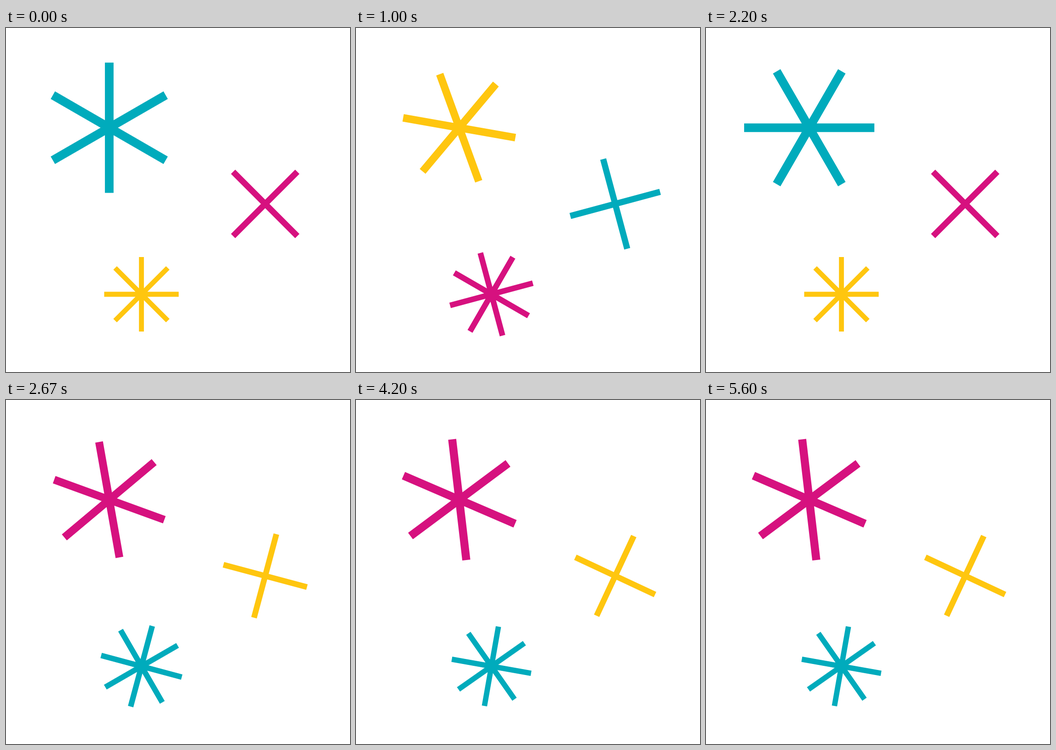
Animation of 748x748 px, one loop 5.74 s. Source, as an HTML page with a canvas:

```html
<!DOCTYPE html>
<html lang="en">
<head>
<meta charset="utf-8">
<title>Spinning stars</title>
<style>
  html, body { margin: 0; width: 100%; height: 100%; overflow: hidden; background: #fff; }
  canvas { display: block; width: 100%; height: 100%; }
</style>
</head>
<body>
<canvas id="stage" width="748" height="748"></canvas>
<script>
const ctx = document.getElementById('stage').getContext('2d');

const LOOP = 5740;
const LAST_STEP = 70;
const BEAT = 400;                           // five steps per beat
const STARTS = [0, 130, 200, 270, 330];     // when each step of a beat begins
const PULSE = 18;                           // steps per pulse cycle
const COLOR_HOLD = 3;                       // steps per colour
const THICKNESS = 0.133;                    // line width relative to arm length

const COLORS = ['#00abbc', '#ffc60f', '#d6117f'];

// turn: degrees per step; keys: [step, arm length] over one pulse cycle
const STARS = [
  { x: 224.5, y: 216.8, bars: 3, angle: 0, turn: 10 / 3, color: 0,
    keys: [[0, 141.6], [5, 118], [9, 141.6], [13, 118], [18, 141.6]] },
  { x: 563.6, y: 382.5, bars: 2, angle: 45, turn: 10, color: 2,
    keys: [[-3, 94], [3, 103.4], [7, 94], [11, 103.4], [15, 94], [21, 103.4]] },
  { x: 294.5, y: 579, bars: 4, angle: 0, turn: -5, color: 1,
    keys: [[0, 81], [5, 97.2], [9, 81], [13, 97.2], [18, 81]] }
];

function stepAt(ms) {
  const t = ms % LOOP;
  const beat = Math.floor(t / BEAT);
  const within = STARTS.filter(s => s <= t - beat * BEAT).length - 1;
  return Math.min(beat * STARTS.length + within, LAST_STEP);
}

function valueAt(keys, p) {
  const i = keys.findIndex(k => k[0] > p);
  const [p0, v0] = keys[i - 1];
  const [p1, v1] = keys[i];
  return v0 + (v1 - v0) * (p - p0) / (p1 - p0);
}

function drawStar(star, step) {
  const len = valueAt(star.keys, step % PULSE);
  const shift = Math.floor(step / COLOR_HOLD);
  ctx.save();
  ctx.translate(star.x, star.y);
  ctx.rotate((star.angle + star.turn * step) * Math.PI / 180);
  ctx.strokeStyle = COLORS[(star.color + shift) % COLORS.length];
  ctx.lineWidth = len * THICKNESS;
  ctx.beginPath();
  for (let i = 0; i < star.bars; i++) {
    ctx.moveTo(0, -len);
    ctx.lineTo(0, len);
    ctx.rotate(Math.PI / star.bars);
  }
  ctx.stroke();
  ctx.restore();
}

function render(ms) {
  const step = stepAt(ms);
  ctx.fillStyle = '#fff';
  ctx.fillRect(0, 0, 748, 748);
  STARS.forEach(star => drawStar(star, step));
}

const begin = performance.now();
function loop() {
  render(performance.now() - begin);
  requestAnimationFrame(loop);
}
loop();
</script>
</body>
</html>
```
